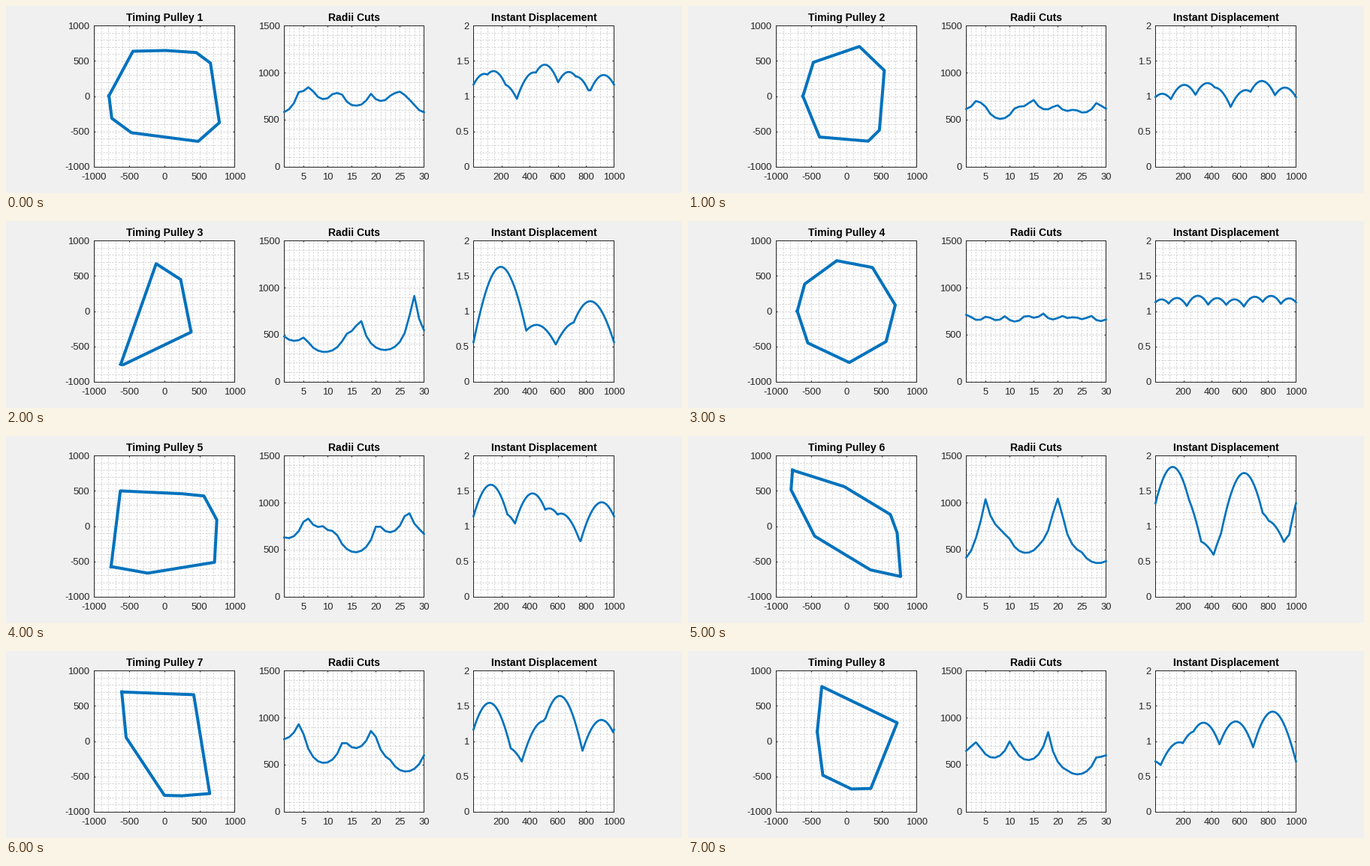
Write a matplotlib script that moves like this. It is 900x250 px and loops after 8 s.

```python
import numpy as np
import matplotlib.pyplot as plt
from matplotlib.animation import FuncAnimation
from matplotlib.ticker import MultipleLocator

W, H, DPI = 900, 250, 100
PX = 72 / DPI
TOP, BOTTOM, SIDE = 26.45, 214.55, 187
BLUE, DARK = "#0072bd", "#262626"
BELT_UNIT = 600
plt.rcParams["font.family"] = "Liberation Sans"


def directions(degrees):
    a = np.radians(degrees)
    return np.array([np.cos(a), np.sin(a)])


def ring(count, left, depth, seed):
    """Convex outline with uneven corners that reaches -left and -depth."""
    jitter = np.random.default_rng(seed).uniform(-0.35, 0.35, count)
    jitter[0] = 0
    points = directions(180 + 360 * (np.arange(count) + jitter) / count).T
    return points / -points.min(axis=0) * (left, depth)


# Corners run counterclockwise; the belt sweep begins at the first one.
PULLEYS = [
    [(-790, 5), (-750, -315), (-470, -520), (480, -643), (782, -377),
     (655, 470), (452, 620), (15, 649), (-449, 638)],
    ring(7, 620, 640, seed=4),
    [(-622, -754), (-587, -762), (380, -298), (231, 449), (-118, 674)],
    ring(8, 700, 730, seed=9),
    [(-760, -575), (-237, -668), (713, -514), (746, 88), (562, 429),
     (257, 460), (-628, 501)],
    [(-767, 795), (-789, 517), (-453, -142), (342, -622), (772, -716),
     (722, -96), (626, 165), (-30, 561)],
    [(-608, 699), (-546, 53), (0, -771), (248, -777), (645, -745),
     (417, 660)],
    [(-416, 132), (-336, -485), (70, -680), (347, -673), (722, 261),
     (-351, 776)],
]


def normals(corners):
    """Outward normals of the edges that leave each corner."""
    dx, dy = (np.roll(corners, -1, axis=0) - corners).T
    return np.column_stack([dy, -dx])


def radii(corners):
    """Distance from the centre to the outline along 30 rays."""
    normal = normals(corners)
    offset = np.sum(normal * corners, axis=1)
    facing = normal @ directions(-90 + 12 * np.arange(30))
    reach = np.full(facing.shape, np.inf)
    np.divide(offset[:, None], facing, out=reach, where=facing > 1e-9)
    return reach.min(axis=0)


def displacement(corners):
    """Support function of the outline over one turn."""
    x, y = normals(corners)[-1]
    start = max(90, np.degrees(np.arctan2(y, x)))
    turn = directions(start + np.linspace(0, 360, 1000))
    return (corners @ turn).max(axis=0) / BELT_UNIT


fig = plt.figure(figsize=(W / DPI, H / DPI), dpi=DPI, facecolor="#f0f0f0")


def label(x, y, s, size=13, **kw):
    return fig.text(x / W, 1 - y / H, s, fontsize=size * PX,
                    va="baseline", **kw)


def panel(left, xlim, ylim, xticks, yticks, minor, title, width, side=SIDE):
    tall = BOTTOM - TOP
    ax = fig.add_axes([left / W, 1 - BOTTOM / H, side / W, tall / H])
    ax.set(xlim=xlim, ylim=ylim, xticks=xticks, yticks=yticks)
    ax.set_axisbelow(True)
    for axis, step in zip((ax.xaxis, ax.yaxis), minor):
        axis.set_minor_locator(MultipleLocator(step))
    ax.tick_params(which="both", direction="in", top=True, right=True,
                   labelbottom=False, labelleft=False, color=DARK,
                   width=PX, length=2 * PX)
    ax.tick_params(which="minor", length=0)
    ax.grid(which="both", color="#cecece", lw=PX, ls=(0, (2, 2)))
    for spine in ax.spines.values():
        spine.set(color=DARK, linewidth=PX)

    for t in xticks:
        x = left + (t - xlim[0]) / (xlim[1] - xlim[0]) * side
        label(x, 232, f"{t:g}", ha="center", color=DARK)
    for t in yticks:
        y = BOTTOM - (t - ylim[0]) / (ylim[1] - ylim[0]) * tall
        label(left - 6, y + 4.6, f"{t:g}", ha="right", color=DARK)
    heading = label(left + side / 2, 20, title, 14, ha="center",
                    weight="bold", color="black")
    line, = ax.plot([], [], color=BLUE, lw=width * PX, clip_on=False,
                    zorder=3, solid_joinstyle="round")
    return line, heading


thousands = range(-1000, 1001, 500)
outline, name = panel(117.45, (-1000, 1000), (-1000, 1000),
                      thousands, thousands, (100, 100), "", 4)
cuts, _ = panel(370.45, (1, 30), (0, 1500), range(5, 31, 5),
                range(0, 1501, 500), (1, 100), "Radii Cuts", 2.67, 186)
travel, _ = panel(622.45, (1, 1000), (0, 2), range(200, 1001, 200),
                  np.arange(0, 2.1, 0.5), (50, 0.1),
                  "Instant Displacement", 2.67)


def update(i):
    corners = np.array(PULLEYS[i], float)
    outline.set_data(*np.vstack([corners, corners[:1]]).T)
    cuts.set_data(np.arange(1, 31), radii(corners))
    travel.set_data(np.arange(1, 1001), displacement(corners))
    name.set_text(f"Timing Pulley {i + 1}")
    return outline, cuts, travel, name


anim = FuncAnimation(fig, update, frames=len(PULLEYS), interval=1000,
                     repeat=True, repeat_delay=0)
plt.show()
```
